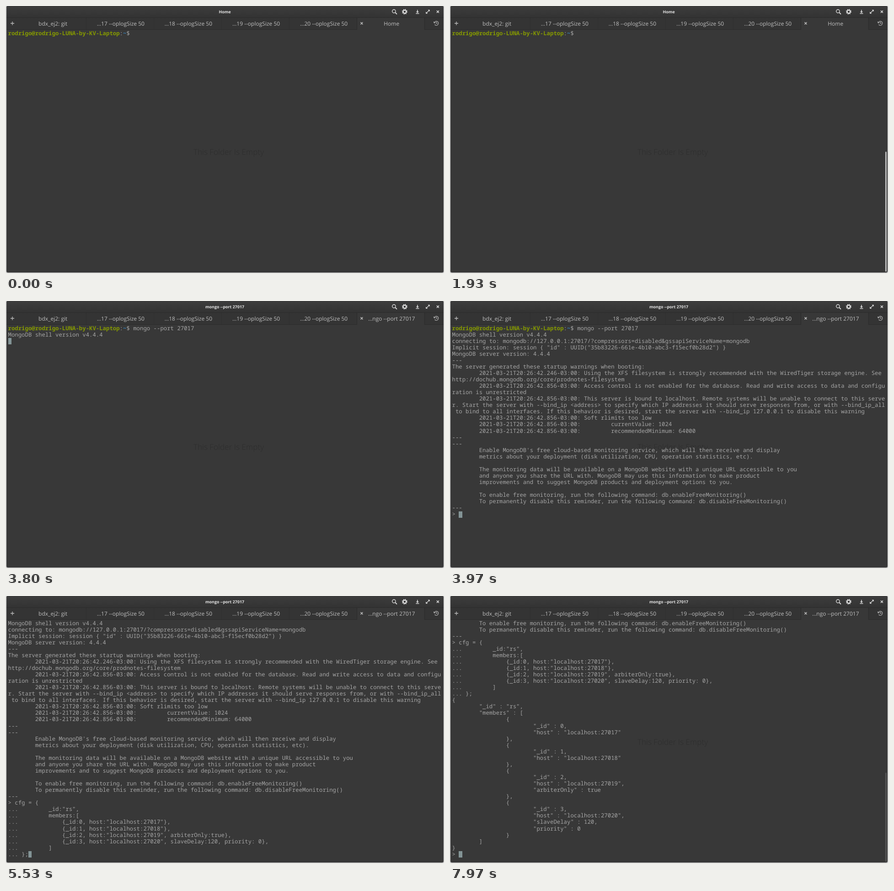
Animation, 958 px wide and 585 px high, one loop 8 s. Source, as an HTML page:

```html
<!DOCTYPE html>
<html lang="en">
<head>
<meta charset="utf-8">
<style>
html, body { margin: 0; width: 100%; height: 100%; overflow: hidden; background: #d4d4d4; }
body { position: relative; text-rendering: geometricPrecision; }
svg, pre, #cursor, #bar { position: absolute; margin: 0; }
svg { left: 0; top: 0; font: 12px "Open Sans", sans-serif; }
pre {
  left: 4.5px; top: 52.5px;
  font: 12.333px/14.07px "Noto Sans Mono", monospace;
  color: #a5a5a5; white-space: pre; font-variant-ligatures: none;
}
pre b { color: #859900; }
pre i { color: #3689c9; font-style: normal; font-weight: bold; }
#cursor { width: 7.4px; height: 14.07px; background: #839496; }
#bar { left: 952px; width: 3px; border-radius: 1.5px; background: #bababa; }
</style>
</head>
<body>
<svg width="958" height="585" viewBox="0 0 958 585">
  <defs>
    <linearGradient id="head" x2="0" y2="1">
      <stop stop-color="#3d3d3d"/><stop offset="1" stop-color="#333"/>
    </linearGradient>
  </defs>
  <rect x="1" width="956" height="584" rx="3" fill="#383838"/>
  <path d="M1 25V3q0-3 3-3H954q3 0 3 3V25z" fill="url(#head)"/>
  <path d="M1 25H957V52H1z" fill="#343434"/>
  <path d="M768 25H916V52H768z" fill="#383838"/>
  <path d="M1 25.5H957M1 51.5H767M916 51.5H957M767.5 25V52M915.5 25V52" stroke="#2b2b2b"/>
  <path d="M175.5 26V51M323.5 26V51M471.5 26V51M619.5 26V51" stroke="#303030"/>
  <text id="title" x="478.5" y="16" text-anchor="middle" fill="#e4e4e4" font-size="8.9" font-weight="700"></text>
  <g id="tabs" text-anchor="middle" fill="#bebebe"></g>
  <g fill="none" stroke="#dedede" stroke-width="1.4">
    <circle cx="848.5" cy="11.5" r="3.7"/>
    <path d="M851.2 14.2L855 18" stroke-width="1.8"/>
    <circle cx="872" cy="12.5" r="3.4" stroke-width="2.2"/>
    <circle cx="872" cy="12.5" r="5.1" stroke-width="1.8" stroke-dasharray="2 2.005"/>
    <path d="M900 8.5V13M896.5 16.5H903.5" stroke-width="1.6"/>
    <path d="M897 12H903L900 15.3z" fill="#dedede" stroke="none"/>
    <path d="M919.5 15.5L925.5 9.5" stroke-width="1.3"/>
    <path d="M922.7 8.3H926.8V12.4zM918.2 12.6V16.8H922.4z" fill="#dedede" stroke="none"/>
    <path d="M942 10L947 15M947 10L942 15" stroke-width="1.6"/>
  </g>
  <g fill="none" stroke="#bebebe" stroke-width="1.3">
    <path d="M10 38H18M14 34V42"/>
    <path d="M775.5 35.5L780.5 40.5M780.5 35.5L775.5 40.5" stroke-width="1.5"/>
    <path d="M937 36A4.6 4.6 0 1 1 937.6 40.7M941.3 34.5V38H944M935.4 34.3L936.6 37.2L939.4 36.2" stroke-width="1.1"/>
  </g>
  <text id="folder" x="487" y="326" text-anchor="middle" fill="#2d2d2d" font-size="17.2" font-weight="300">This Folder Is Empty</text>
</svg>
<pre><span id="prompt"><b>rodrigo@rodrigo-LUNA-by-KV-Laptop</b>:<i>~</i>$ </span><span id="text"></span></pre>
<div id="cursor"></div>
<div id="bar"></div>
<script>
const $ = id => document.getElementById(id);
const LOOP = 8000, ROWS = 37, CELL = 7.4, LINE = 14.07, PROMPT = 37;

const stamp = "        2021-03-21T20:26:42.856-03:00: ";
const member = (id, port, ...extra) => {
  const fields = [`"_id" : ${id}`, `"host" : "localhost:${port}"`, ...extra];
  return `                {
${fields.map(f => " ".repeat(24) + f).join(",\n")}
                }`;
};
const lines = `mongo --port 27017
MongoDB shell version v4.4.4
connecting to: mongodb://127.0.0.1:27017/?compressors=disabled&gssapiServiceName=mongodb
Implicit session: session { "id" : UUID("35b83226-661e-4b10-abc3-f15ecf0b28d2") }
MongoDB server version: 4.4.4
---
The server generated these startup warnings when booting:
${stamp.replace("856", "246")}Using the XFS filesystem is strongly recommended with the WiredTiger storage engine. See
http://dochub.mongodb.org/core/prodnotes-filesystem
${stamp}Access control is not enabled for the database. Read and write access to data and configu
ration is unrestricted
${stamp}This server is bound to localhost. Remote systems will be unable to connect to this serve
r. Start the server with --bind_ip <address> to specify which IP addresses it should serve responses from, or with --bind_ip_all
 to bind to all interfaces. If this behavior is desired, start the server with --bind_ip 127.0.0.1 to disable this warning
${stamp}Soft rlimits too low
${stamp}        currentValue: 1024
${stamp}        recommendedMinimum: 64000
---
---
        Enable MongoDB's free cloud-based monitoring service, which will then receive and display
        metrics about your deployment (disk utilization, CPU, operation statistics, etc).

        The monitoring data will be available on a MongoDB website with a unique URL accessible to you
        and anyone you share the URL with. MongoDB may use this information to make product
        improvements and to suggest MongoDB products and deployment options to you.

        To enable free monitoring, run the following command: db.enableFreeMonitoring()
        To permanently disable this reminder, run the following command: db.disableFreeMonitoring()
---
> cfg = {
...         _id:"rs",
...         members:[
...             {_id:0, host:"localhost:27017"},
...             {_id:1, host:"localhost:27018"},
...             {_id:2, host:"localhost:27019", arbiterOnly:true},
...             {_id:3, host:"localhost:27020", slaveDelay:120, priority: 0},
...         ]
... };
{
        "_id" : "rs",
        "members" : [
${[
  member(0, 27017),
  member(1, 27018),
  member(2, 27019, '"arbiterOnly" : true'),
  member(3, 27020, '"slaveDelay" : 120', '"priority" : 0')
].join(",\n")}
        ]
}
> `.split("\n");

// [time, cursor row, cursor column]; everything before the cursor is printed
const steps = [
  [0, 0, 0], [2930, 0, 18], [3700, 1, 0], [3770, 2, 0], [3830, 4, 0],
  [3900, 5, 0], [3930, 29, 2], [5530, 37, 6], [7570, 62, 2]
];
const blinks = [130, 730, 1330, 1930, 2530, 3530, 3700, 4300, 4900, 6800, 7400];
const names = ["bdx_ej2: git", ...[17, 18, 19, 20].map(n => `…${n} --oplogSize 50`), ""];

$("tabs").innerHTML = names.map((name, i) =>
  `<text x="${102.7 + 148.1 * i}" y="42.5">${name}</text>`).join("");
const lastTab = $("tabs").lastChild;

const ease = (t, start) => 1 - (1 - Math.min(1, Math.max(0, (t - start) / 1000))) ** 3;
const pulse = (t, show, hide) => ease(t, show) - ease(t, hide);

function draw(t) {
  const [, row, col] = steps.findLast(s => s[0] <= t);
  const top = Math.max(0, row - ROWS + 1);
  const running = t >= 3730;

  $("title").textContent = running ? "mongo --port 27017" : "Home";
  lastTab.textContent = running ? "…ngo --port 27017" : "Home";
  $("prompt").hidden = top > 0;
  $("text").textContent = [...lines.slice(top, row), lines[row].slice(0, col)].join("\n");
  $("folder").style.opacity = t >= 5530 && t < 7570 ? 0 : 1;

  const cursor = $("cursor").style;
  cursor.left = 4.5 + CELL * (row ? col : PROMPT + col) + "px";
  cursor.top = 52.5 + LINE * (row - top) + "px";
  cursor.opacity = blinks.filter(b => b <= t).length % 2;

  // one page of cleared scrollback sits above the text
  const size = 526 * ROWS / (ROWS + Math.max(ROWS, row + 1));
  const bar = $("bar").style;
  bar.top = 582 - size + "px";
  bar.height = size + "px";
  bar.opacity = pulse(t, 30, 2200) + pulse(t, 5530, 7570);
}

const start = performance.now();
function tick() {
  draw((performance.now() - start) % LOOP);
  requestAnimationFrame(tick);
}
tick();
</script>
</body>
</html>
```
